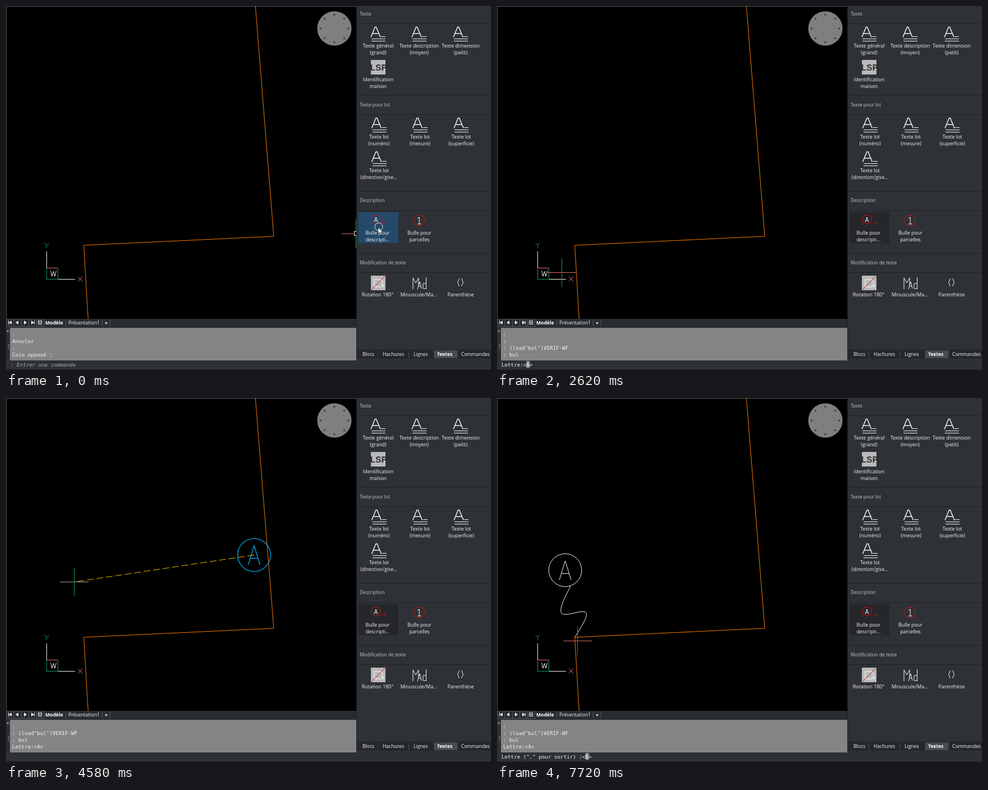
Write an HTML page that moves like this. It is 864 px wide and 648 px high and loops after 8000 ms.

```html
<!DOCTYPE html>
<html lang="fr">
<head>
<meta charset="utf-8">
<title>Bulle de description</title>
<style>
  html, body { margin: 0; width: 100%; height: 100%; overflow: hidden; background: #000; }
  svg { display: block; width: 864px; height: 648px; }
  text { font-family: "Open Sans", "Noto Sans", sans-serif; font-size: 8.9px; fill: #f4f4f4; white-space: pre; }
  .head { font-size: 8.4px; fill: #c4c6c8; }
  .tab { font-size: 8.6px; }
  .bold { font-weight: 700; fill: #fff; }
  .mid { text-anchor: middle; }
  .mono text, text.mono { font-family: "DejaVu Sans Mono", "Liberation Mono", monospace; font-size: 9.2px; }
  .ln { fill: none; stroke-width: 1; }
  .crisp { shape-rendering: crispEdges; }
  .w { stroke: #f2f2f2; }
  .red { stroke: #e00a0a; }
  .x { stroke: #e06c66; }
  .y { stroke: #159a58; }
</style>
</head>
<body>
<svg viewBox="0 0 864 648" xmlns="http://www.w3.org/2000/svg">
  <defs>
    <clipPath id="view"><rect x="1" y="1" width="623" height="556"/></clipPath>
    <clipPath id="chip"><rect width="26" height="26"/></clipPath>
    <g id="style" class="ln w">
      <path stroke-width="1.5" d="M0 18.5 L7.5 .5 H9.5 L17 18.5 M3 12 H14"/>
      <path class="crisp" d="M18 17.5H26M1 21.5H26M1 25.5H26"/>
    </g>
    <g id="bubble">
      <circle r="29.3"/>
      <path d="M-10.5 17.5 L0 -16.5 L10.5 17.5 M-7 6 H7"/>
    </g>
  </defs>

  <rect width="864" height="648" fill="#2e3135"/>
  <rect width="624" height="557" fill="#000"/>
  <path class="ln crisp" stroke="#54575b" d="M0 .5H624M.5 0V557"/>

  <g clip-path="url(#view)">
    <path class="ln" stroke="#f57a00" d="M444.3 0 L477 410 L138.5 426 L146.3 557"/>
    <circle cx="585" cy="40" r="30.5" fill="#7f7f7f"/>
    <g id="compass" fill="#2c2c2c"></g>

    <g class="ln crisp">
      <path class="w" d="M72.5 437V466M93 486.5H123"/>
      <path class="y" d="M72.5 466V486.5H93M92.5 466V486"/>
      <path class="x" d="M73 466.5H92"/>
    </g>
    <path class="ln x" d="M128 481.5 L136 490.5 M136 481.5 L128 490.5"/>
    <path class="ln y" d="M68.5 421.5 L72.5 426.5 L76.5 421.5 M72.5 426.5 V431"/>
    <path class="ln w" d="M79.5 471.5 L82 481 L84.5 472 L87 481 L89.5 471.5"/>

    <path id="leader" class="ln w"/>
    <use id="tag" href="#bubble" fill="none"/>
    <path id="rubber" class="ln" stroke="#ecb800" stroke-dasharray="12 5"/>
    <g id="cross" class="ln crisp">
      <path id="crossX" d="M-25 .5H26"/>
      <path class="y" d="M.5 -25V26"/>
      <rect id="pick" class="w" fill="#000" x="-2.5" y="-3.5" width="7" height="7"/>
    </g>
    <path id="snap" class="ln" stroke="#ff5a00" stroke-width="1.5"/>
  </g>

  <!-- layout tabs -->
  <rect y="557" width="624" height="15" fill="#292c30"/>
  <g id="nav" class="ln crisp" stroke="#54585d"></g>
  <path fill="#f2f2f2" d="M4 560h1v7h-1zM10 560v7l-5-3.500zM22 560v7l-5-3.500zM32 560v7l5-3.500zM45 560v7l5-3.500zM50 560h1v7h-1z"/>
  <path class="ln w crisp" d="M57.500 560.500h6v6h-6zM59 563.500h3M60.500 562v3"/>
  <text class="tab bold" x="70" y="567">Modèle</text>
  <text class="tab" x="111" y="567">Présentation1</text>
  <path class="ln w crisp" d="M176 564.500h5M178.500 562v5"/>

  <!-- command window -->
  <rect y="572" width="7" height="59" fill="#2a2d31"/>
  <path class="ln" stroke="#ccc" d="M1.500 577l3.500 3.500M5 577l-3.500 3.500"/>
  <path class="ln" stroke="#ddd" stroke-width="1.500" stroke-dasharray="1.500 2" d="M4.500 602V612"/>
  <rect x="7" y="573" width="617" height="58" fill="#848484"/>
  <rect y="631" width="864" height="17" fill="#2d3034"/>
  <path class="ln crisp" stroke="#1d1f22" d="M0 647.500H864"/>
  <g id="log" class="mono"></g>
  <rect id="mark" y="632" width="6" height="12" fill="#8797a5"/>
  <text id="prompt" class="mono" x="8" y="642"></text>

  <!-- tool panel -->
  <g id="panel"></g>

  <g id="arrow">
    <circle id="ring" class="ln" stroke="#dfe8ef" cx="1" cy="-1" r="7"/>
    <path fill="#fff" stroke="#222" stroke-width=".7" d="M0 0V11.500L2.700 9L4.600 13.300L6.500 12.500L4.600 8.300H8.200Z"/>
  </g>
  <path id="beam" class="ln w crisp" d="M-2 -5.500H0M1 -5.500H3M.5 -5V6M-2 6.500H0M1 6.500H3"/>
</svg>

<script>
const $ = id => document.getElementById(id);
const LOOP = 8000, CHAR = 5.54;

/* ---------- static parts ---------- */
const text = (x, y, s, cls = '') => `<text x="${x}" y="${y}" class="${cls}">${s}</text>`;
const label = (x, y, ...rows) => rows.map((s, i) => text(x, y + 12 * i, s, 'mid')).join('');
const at = (x, y, body) => `<g transform="translate(${x} ${y})">${body}</g>`;
const styleTool = (x, y, ...rows) =>
  `<use href="#style" x="${x - 13}" y="${y}"/>` + label(x, y + 37, ...rows);

$('compass').innerHTML = Array.from({ length: 8 }, (_, i) =>
  `<path d="M585 13l2 3.500h-4z" transform="rotate(${i * 45} 585 40)"/>`).join('');
$('nav').innerHTML = [0, 1, 2, 3, 4].map(i =>
  `<rect x="${.5 + i * 13.400}" y="557.500" width="13.400" height="13"/>`).join('') +
  '<path d="M106.500 558V571M171.500 558V571M185.500 558V571"/>';

$('panel').innerHTML =
  '<g class="ln crisp" stroke="#202225"><path d="M624.500 0V631"/>' +
  [31, 158, 193, 329, 364, 440, 474, 612].map(y => `<path d="M626 ${y}.5H864"/>`).join('') + '</g>' +
  [['Texte', 17], ['Texte pour lot', 179], ['Description', 349], ['Modification de texte', 460]]
    .map(([s, y]) => text(630, y, s, 'head')).join('') +
  styleTool(663, 37, 'Texte général', '(grand)') +
  styleTool(736, 37, 'Texte description', '(moyen)') +
  styleTool(810, 37, 'Texte dimension', '(petit)') +
  at(650, 96, `<g clip-path="url(#chip)"><rect width="26" height="26" fill="#b9b9b9"/>
    <text x="-2" y="19" style="font:700 17px 'Liberation Mono',monospace;fill:#34373a">LSP</text></g>`) +
  label(663, 134, 'Identification', 'maison') +
  styleTool(664.5, 199, 'Texte lot', '(numéro)') +
  styleTool(737.5, 199, 'Texte lot', '(mesure)') +
  styleTool(811, 199, 'Texte lot', '(superficie)') +
  styleTool(664.5, 259, 'Texte lot', '(direction/gise...') +
  '<rect id="button" x="628" y="367" width="71" height="55"/>' +
  at(659, 380, `<circle class="ln red" r="8" stroke-width="1.300"/>
    <path class="ln w" stroke-width="1.400" d="M-3 4.500L0 -4L3 4.500M-2 2H2"/>
    <path class="ln red" d="M6 6L9 8.500M11 8.500L13 6M13 5H16V8"/>`) +
  label(662, 406.5, 'Bulle pour', 'descripti...') +
  at(736, 382, `<circle class="ln red" r="9.700" stroke-width="1.400"/>
    <path class="ln w" stroke-width="1.800" d="M-3 -4L.3 -6V6M-3 6H3.500"/>`) +
  label(736.5, 406.5, 'Bulle pour', 'parcelles') +
  at(650, 480, `<rect width="26" height="26" fill="#b9b9b9"/>
    <path class="ln" stroke="#fff" stroke-width="1.500" d="M6 20V7H17L21 11V17M7 20H17L21 16L24 19M21 16V22"/>
    <path class="ln" stroke="#e01414" stroke-width="2.500" d="M1 25L25 1"/>`) +
  at(724, 483, `<path class="ln w" stroke-width="1.500"
    d="M1 21V1L6 10L11 1V14M9 21L13 8L16 20M11 16H15M24.500 0V21M24 11H19V20H24"/>`) +
  at(804, 485, `<path class="ln w" stroke-width="1.400"
    d="M4 0Q1.500 1 2 5L0 7L2 9Q1.500 13 4 14M7 0Q9.500 1 9 5L11 7L9 9Q9.500 13 7 14"/>`) +
  label(662, 517, 'Rotation 180°') + label(735.5, 517, 'Minuscule/Ma...') + label(810, 517, 'Parenthèse') +
  `<rect x="626" y="613" width="238" height="15" fill="#25282b"/>
   <rect x="762.500" y="613" width="42" height="14" fill="#484b50"/>
   <path class="ln crisp" stroke="#45484c" d="M662.500 614V627M717.500 614V627"/>` +
  [['Blocs', 635], ['Hachures', 671], ['Lignes', 726], ['Commandes', 811]]
    .map(([s, x]) => text(x, 623, s, 'tab')).join('') + text(768, 623, 'Textes', 'tab bold');

/* ---------- mouse path: time, x, y ---------- */
const KEYS = [
  [0, 664, 395], [30, 664, 395], [400, 632, 408], [810, 359, 499], [950, 270, 556],
  [1100, 148, 600], [1300, 60, 630], [1450, 25, 634], [1640, 52, 637], [1850, 63, 636],
  [2160, 63, 636], [2440, 96, 556], [2620, 115, 474], [3020, 156, 365], [3300, 156, 365],
  [3500, 153, 355], [3710, 153, 355], [4380, 126, 337], [4500, 126, 337], [4580, 121, 327],
  [4640, 118, 315], [4690, 122, 305], [5050, 122, 305], [5300, 132, 336], [5790, 132, 336],
  [6260, 119, 385], [6380, 119, 385], [6690, 156, 380], [6780, 156, 380], [7170, 139, 427],
  [7230, 139, 427], [7320, 143, 432], [LOOP, 143, 432]
];
const slope = (i, k) => (KEYS[i + 1][k] - KEYS[i][k]) / (KEYS[i + 1][0] - KEYS[i][0]);
// Monotone tangents: smooth through keys, still at rests and turns.
function tangent(i, k) {
  if (i === 0 || i === KEYS.length - 1) return 0;
  const a = slope(i - 1, k), b = slope(i, k);
  return a * b <= 0 ? 0 : 2 * a * b / (a + b);
}
function mouseAt(t) {
  let i = 0;
  while (i < KEYS.length - 2 && KEYS[i + 1][0] <= t) i++;
  const h = KEYS[i + 1][0] - KEYS[i][0], u = (t - KEYS[i][0]) / h;
  return [1, 2].map(k => {
    const p = KEYS[i][k], q = KEYS[i + 1][k];
    return p + (q - p) * u * u * (3 - 2 * u) +
      h * u * (1 - u) * ((1 - u) * tangent(i, k) - u * tangent(i + 1, k));
  });
}

/* ---------- leader: natural cubic spline by chord length ---------- */
const CLICKS = [[5670, 131, 335], [6410, 118.5, 385], [6760, 156, 380.5], [7260, 138.5, 426]];

function splinePath(pts) {
  const n = pts.length - 1, h = [];
  for (let i = 0; i < n; i++) h.push(Math.hypot(pts[i + 1][0] - pts[i][0], pts[i + 1][1] - pts[i][1]));
  const bends = [0, 1].map(k => {
    const c = Array(n + 1).fill(0), d = Array(n + 1).fill(0), m = Array(n + 1).fill(0);
    for (let i = 1; i < n; i++) {
      const r = 6 * ((pts[i + 1][k] - pts[i][k]) / h[i] - (pts[i][k] - pts[i - 1][k]) / h[i - 1]);
      const w = 2 * (h[i - 1] + h[i]) - h[i - 1] * c[i - 1];
      c[i] = h[i] / w;
      d[i] = (r - h[i - 1] * d[i - 1]) / w;
    }
    for (let i = n - 1; i > 0; i--) m[i] = d[i] - c[i] * m[i + 1];
    return m;
  });
  let path = 'M' + pts[0];
  for (let i = 0; i < n; i++) {
    const p = pts[i], q = pts[i + 1], s = h[i] * h[i] / 18;
    const a = [0, 1].map(k => (2 * p[k] + q[k]) / 3 - s * (2 * bends[k][i] + bends[k][i + 1]));
    const b = [0, 1].map(k => (p[k] + 2 * q[k]) / 3 - s * (bends[k][i] + 2 * bends[k][i + 1]));
    path += `C${a} ${b} ${q}`;
  }
  return path;
}
function leaderAt(t, mouse) {
  const pts = CLICKS.filter(c => c[0] <= t).map(c => c.slice(1));
  if (!pts.length) return '';
  if (t < 7700) {
    const last = pts[pts.length - 1];
    const end = t > 7100 && t < 7260 ? CLICKS[3].slice(1) : mouse;
    if (Math.hypot(end[0] - last[0], end[1] - last[1]) > 2) pts.push(end);
  }
  return pts.length > 1 ? splinePath(pts) : '';
}

/* ---------- command window ---------- */
const LOAD = ': (load"bul")VERIF-WF';
const STATES = [
  { from: 0, log: [':', 'Annuler', ':', 'Coin opposé :'], prompt: ': Entrer une commande', hint: true },
  { from: 150, log: [':', ':', LOAD, ': bul'], prompt: 'Lettre:<A>' },
  { from: 3170, log: [':', LOAD, ': bul', 'Lettre:<A>'], prompt: '' },
  { from: 7700, log: [':', LOAD, ': bul', 'Lettre:<A>'], prompt: 'Lettre ("." pour sortir) :<B>' }
];
let shown;
function setConsole(s) {
  if (s === shown) return;
  shown = s;
  $('log').innerHTML = s.log.map((row, i) =>
    text(11, 587.5 + 12 * i, row.replace('<', '&lt;'))).join('');
  $('prompt').textContent = s.prompt;
  $('prompt').style.fontStyle = s.hint ? 'italic' : 'normal';
  $('prompt').style.fill = s.hint ? '#a9abad' : '#f4f4f4';
  const cell = s.prompt.indexOf('<');
  show('mark', cell >= 0);
  $('mark').setAttribute('x', 8 + (cell + 1) * CHAR);
}

/* ---------- frame ---------- */
const show = (id, on) => { $(id).style.display = on ? '' : 'none'; };
const move = (id, x, y) => $(id).setAttribute('transform', `translate(${x} ${y})`);

function draw(t) {
  const mouse = mouseAt(t), [x, y] = mouse.map(Math.round);
  const inside = x < 624 && y < 557;
  const [cx, cy] = inside ? [x, y] : t < 900 ? [623, 405] : [270, 556];
  const dragging = t >= 3170 && t < 4840;

  setConsole(STATES.filter(s => s.from <= t).pop());
  $('button').setAttribute('fill', x > 628 ? '#24496a' : '#25272a');

  move('cross', cx, cy);
  $('crossX').setAttribute('stroke', dragging ? '#a89c90' : '#e06c66');
  show('pick', t < 150);

  show('tag', t >= 3170);
  move('tag', dragging ? 442 : 121.5, dragging ? 279.5 : 306.5);
  $('tag').setAttribute('stroke', dragging ? '#0093c9' : '#f2f2f2');
  $('tag').setAttribute('stroke-width', dragging ? 1.6 : 1);
  show('rubber', dragging);
  $('rubber').setAttribute('d', `M442 279.500L${cx + .5} ${cy + .5}`);
  $('leader').setAttribute('d', leaderAt(t, [x + .5, y + .5]));

  const near = t >= 5270 && t < 5670, corner = t >= 7120 && t < 7260;
  $('snap').setAttribute('d', near ? 'M127 329h8l-8 9h8z' : corner ? 'M134 421.500h9v9h-9z' : '');

  const beam = !inside && x < 624 && y > 572;
  show('arrow', !inside && !beam);
  show('beam', beam);
  show('ring', t < 200);
  move('arrow', x - 1, y - 1);
  move('beam', x, y);
}

const start = performance.now();
function tick() {
  draw((performance.now() - start) % LOOP);
  requestAnimationFrame(tick);
}
tick();
</script>
</body>
</html>
```
